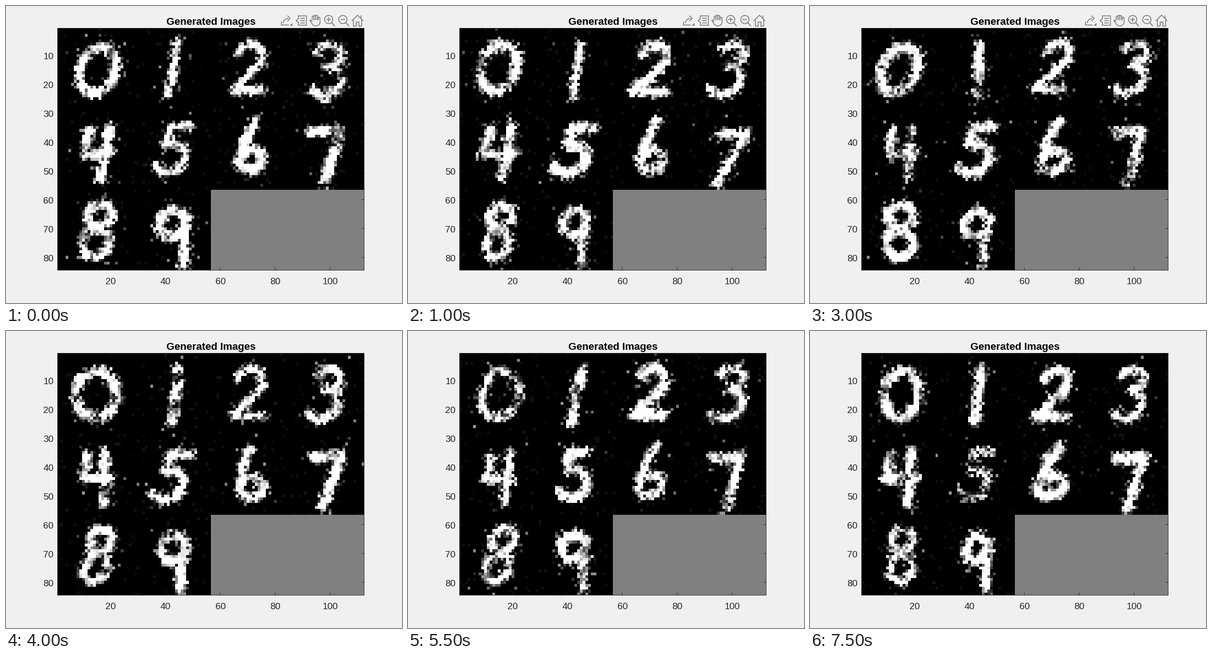
Write a matplotlib script that moves like this. It is 864x648 px and loops after 8000 ms.

```python
import numpy as np
import matplotlib.pyplot as plt
from matplotlib.animation import FuncAnimation
from matplotlib.patches import Circle, Polygon

W, H, DPI = 864, 648, 100
PX = 72 / DPI
FRAMES, STEP = 16, 500
TOOLBAR_END = 7
LEFT, RIGHT, TOP, BOTTOM = 112, 782, 48, 577
CELL = 28
INK, ICON = "#262626", "#757575"

plt.rcParams["font.family"] = "Liberation Sans"


def arc(cx, cy, rx, ry, start=0, end=360):
    a = np.radians(np.linspace(start, end, 40))
    return np.column_stack([cx + rx * np.cos(a), cy + ry * np.sin(a)])


def path(*corners):
    """Evenly sampled polyline through (x, y) corners."""
    p = np.array(corners, float)
    t = np.linspace(0, len(p) - 1, 20 * len(p))
    return np.column_stack([np.interp(t, np.arange(len(p)), p[:, k]) for k in (0, 1)])


# Pen strokes of the ten digits, upright, on a 28 x 28 cell
DIGITS = [
    [arc(15, 15, 6.6, 8)],
    [path((15, 6), (15, 24))],
    [arc(14.5, 10.5, 4.5, 4.5, -160, 40), path((18, 13.5), (9.5, 22)), path((9.5, 22), (20, 22))],
    [arc(14.5, 10, 4.5, 3.5, -150, 80), arc(14.5, 18.5, 5.5, 5, -90, 140)],
    [path((11, 8), (10, 16), (20, 16)), path((18, 7), (18, 24.5))],
    [path((19, 7), (12.5, 7.5), (12, 13)), arc(14, 18, 5.5, 5, -110, 145)],
    [path((15, 5), (12, 11), (11, 18)), arc(15, 18.5, 4.3, 3.5)],
    [path((9, 9), (18.5, 8.5), (17, 17), (15, 26))],
    [arc(15, 9.5, 4.2, 4), arc(15, 19, 4.4, 4.8)],
    [arc(14, 12, 4.2, 4.2), path((18.5, 10), (18, 18), (18.5, 26))],
]
ROWS, COLS = np.mgrid[1:CELL + 1, 1:CELL + 1]


def handwrite(strokes, rng):
    """Lean, stretch and shift a digit as a new hand would."""
    lean, grow = rng.normal(.16, .09), rng.uniform(.92, 1.1)
    x, y = np.vstack(strokes).T - 15
    return 15 + grow * x - lean * y + rng.normal(0, .3), 15 + y + rng.normal(0, .3)


def blotches(rng):
    """Smooth field of about -1 to 1 that fades parts of a stroke."""
    field = 0
    for _ in range(3):
        kx, ky = rng.normal(0, .4, 2)
        field = field + np.sin(kx * COLS + ky * ROWS + rng.uniform(0, 2 * np.pi))
    return field / 2


def glyph(digit, rng):
    x, y = handwrite(DIGITS[digit], rng)
    dist = np.hypot(COLS[..., None] - x, ROWS[..., None] - y).min(-1)
    width, mess = rng.uniform(1.2, 1.8), rng.uniform(.2, .9)
    size = dist.shape

    ink = np.clip(1.15 + mess * blotches(rng), .1, 1.2)
    ragged = dist + rng.normal(0, .55, size)
    v = ink * np.clip((width + .6 - ragged) / 1.1, 0, 1)
    v += (v > .05) * (.05 + .3 * (ink < .9)) * rng.normal(size=size)

    stray = rng.random(size) < .2 * np.exp(-np.maximum(dist - width, 0) / 1.5)
    dust = rng.random(size) < .05
    v = np.maximum(v, stray * rng.uniform(.05, .6, size))
    return np.clip(np.maximum(v, dust * rng.uniform(0, .08, size)), 0, 1)


def sheet(frame):
    img = np.full((3 * CELL, 4 * CELL), 128 / 255)
    for digit in range(10):
        r, c = CELL * (digit // 4), CELL * (digit % 4)
        img[r:r + CELL, c:c + CELL] = glyph(digit, np.random.default_rng([frame, digit]))
    return img


fig = plt.figure(figsize=(W / DPI, H / DPI), dpi=DPI, facecolor="#f0f0f0")
ax = fig.add_axes([0, 0, 1, 1])
picture = ax.imshow(sheet(0), cmap="gray", vmin=0, vmax=1, interpolation="nearest",
                    aspect="auto", extent=(LEFT, RIGHT, BOTTOM, TOP), zorder=1)
ax.set(xlim=(0, W), ylim=(H, 0))
ax.axis("off")


def line(*pts, color=ICON, width=1.7):
    x, y = zip(*pts)
    return ax.plot(x, y, color=color, lw=width * PX, zorder=3, snap=False,
                   solid_capstyle="butt", solid_joinstyle="miter")[0]


def rule(*pts):
    """Hairline on whole pixels."""
    line(*[(np.floor(x) + .5, np.floor(y) + .5) for x, y in pts], color=INK, width=1)


def label(x, y, text, size=20.4, color=INK, **kw):
    ax.text(x, y, text, fontsize=size * PX, va="baseline", color=color, **kw)


def frame_box():
    l, r, t, b, tick = LEFT, RIGHT - 1, TOP, BOTTOM - 1, 6
    rule((l, t), (r, t), (r, b), (l, b), (l, t))
    for n in range(20, 101, 20):
        x = LEFT + (n - .5) * (RIGHT - LEFT) / (4 * CELL)
        rule((x, b), (x, b - tick))
        rule((x, t), (x, t + tick))
        label(x, 607, str(n), ha="center")
    for n in range(10, 81, 10):
        y = TOP + (n - .5) * (BOTTOM - TOP) / (3 * CELL)
        rule((l, y), (l + tick, y))
        rule((r, y), (r - tick, y))
        label(104, y + 8, str(n), ha="right")
    label(447, 41, "Generated Images", 22.5, "black", ha="center", weight="bold")


def share_icon():
    tail = arc(616, 38, 11, 11, 185, 270)
    return [line((601, 34), (601, 41.5), (617, 41.5)), line(*tail),
            line((614, 21), (620, 27), (614, 33)),
            ax.add_patch(Polygon([(625, 37), (625, 43), (619, 43)], fc=ICON, ec="none", zorder=3))]


def tip_icon():
    box = line((638, 21.5), (655.5, 21.5), (655.5, 42), (638, 42), (638, 36),
               (633, 32), (638, 27.5), (638, 20.6))
    return [box] + [line((642, y), (652, y)) for y in (27, 32, 37)]


def hand_icon():
    fingers = [line((x - 2, 31), *arc(x, top + 2, 2, 2, 180, 360), (x + 2, 31))
               for x, top in ((670, 22), (674, 20), (678, 20.5), (683, 24.5))]
    palm = line((668, 34), (664, 30.5), (663, 32), *arc(676, 34, 9.5, 9.5, 140, 0), (685, 30))
    return fingers + [palm]


def lens_icon(x, plus):
    parts = [ax.add_patch(Circle((x, 29.5), 9, fc="none", ec=ICON, lw=1.7 * PX, zorder=3)),
             line((x + 6.5, 36), (x + 13, 44), width=2),
             line((x - 5, 29.5), (x + 5, 29.5))]
    return parts + ([line((x, 24.5), (x, 34.5))] if plus else [])


def home_icon():
    return [line((754.5, 32.5), (767, 20), (779.5, 32.5)),
            line((758, 30), (758, 44), (764, 44), (764, 35), (770, 35), (770, 44), (776, 44), (776, 30)),
            line((774.5, 27), (774.5, 20.5))]


frame_box()
icons = [*share_icon(), *tip_icon(), *hand_icon(),
         *lens_icon(704, True), *lens_icon(735, False), *home_icon()]


def draw(frame):
    picture.set_data(sheet(frame))
    for part in icons:
        part.set_visible(frame < TOOLBAR_END)
    return [picture, *icons]


anim = FuncAnimation(fig, draw, frames=FRAMES, interval=STEP, repeat=True, repeat_delay=0)
plt.show()
```
